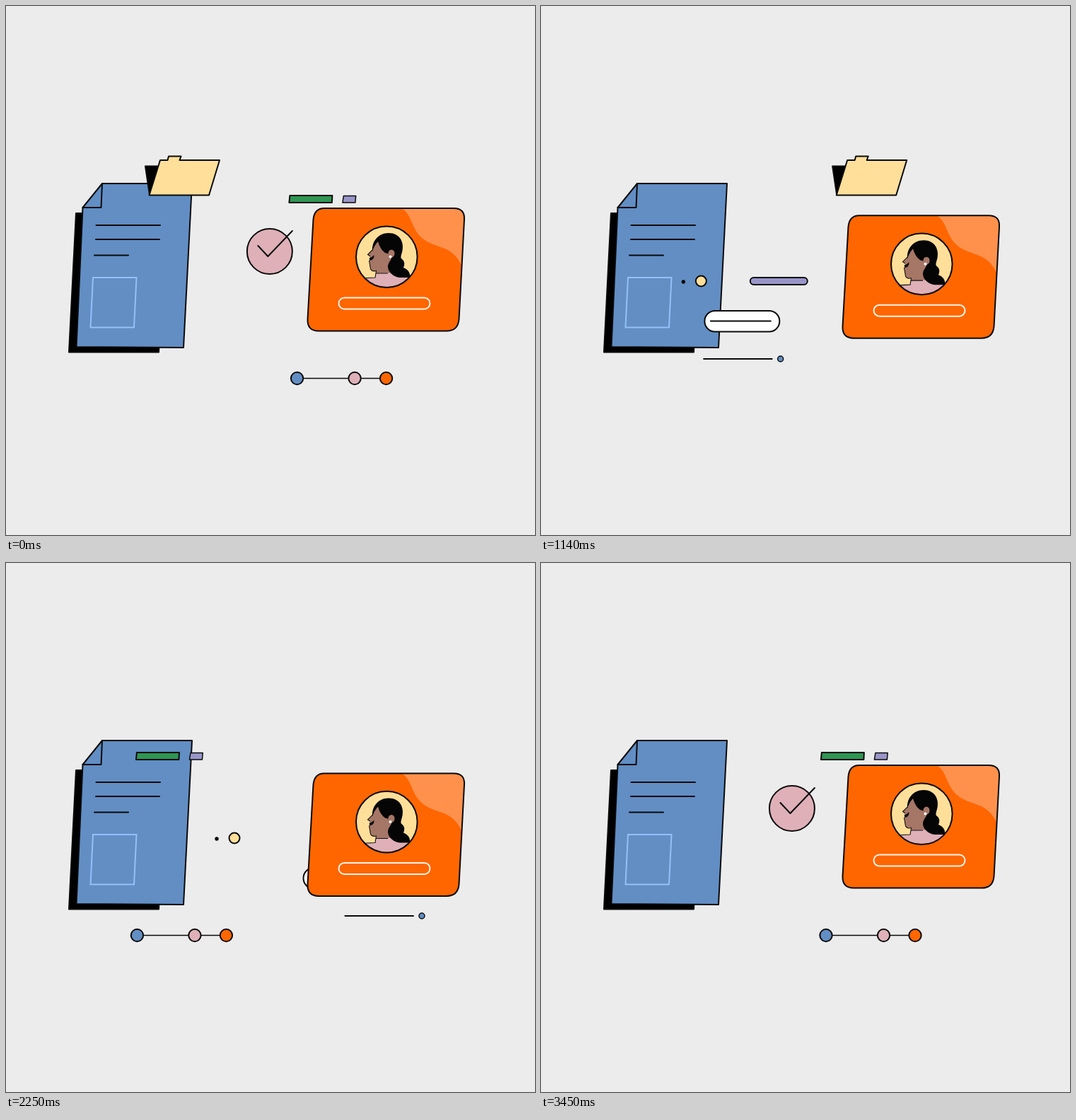
An HTML page that plays this animation: 748 by 748 pixels, repeating every 3510 ms.

```html
<!DOCTYPE html>
<html lang="en">
<head>
<meta charset="utf-8">
<title>Document flow</title>
<style>
html, body { margin: 0; width: 100%; height: 100%; overflow: hidden; background: #ececec; }
svg { display: block; width: 100vw; height: 100vh; }
.ink { stroke: #0a0a0a; stroke-width: 2; stroke-linejoin: round; stroke-linecap: round; }
.line { fill: none; }
.thin { stroke-width: 1.5; }
.blue { fill: #628ec4; }
.pink { fill: #dfb0b8; }
.yellow { fill: #ffdf9a; }
.orange { fill: #ff6600; }
.purple { fill: #9a95c9; }
.skin { fill: #a67667; }
</style>
</head>
<body>
<svg viewBox="0 0 748 748">
  <defs>
    <filter id="rough" filterUnits="userSpaceOnUse" x="0" y="0" width="748" height="748" color-interpolation-filters="sRGB">
      <feTurbulence type="fractalNoise" baseFrequency=".25" seed="4"/>
      <feDisplacementMap in="SourceGraphic" scale="1.2" xChannelSelector="R" yChannelSelector="G"/>
    </filter>
    <clipPath id="portrait"><circle cx="538.3" cy="354.7" r="43"/></clipPath>
    <path id="panel" d="M450 286H633Q649 286 648 302L640.5 443Q639 459.5 623 459.5H442Q426 459.5 426.5 443L434.5 302Q436 286 450 286Z"/>
  </defs>
  <g filter="url(#rough)">
    <g id="paper">
      <path d="M99 293H225L216 489.5H89Z" class="ink"/>
      <path d="M136 251H263L251 483L99.5 482L108.5 285Z" class="ink blue"/>
      <path d="M136 251L134.5 285H108.5M127.5 310H218M127 330H217M125 352.5H173" class="ink line"/>
      <path d="M123 384H184.5L181 454.5H119.5Z" class="line" stroke="#94c0f8" stroke-width="2"/>
    </g>

    <g id="knob" class="ink">
      <circle cx="212" cy="390" r="1.7"/>
      <circle cx="237" cy="389" r="7.5" class="yellow"/>
    </g>
    <g id="pill" class="ink">
      <rect x="192.5" y="431" width="106" height="29.5" rx="14.7" fill="#fff"/>
      <path d="M201 445.5H286"/>
    </g>
    <rect id="stick" x="258.5" y="384" width="81" height="10" rx="5" class="ink purple"/>
    <g id="check" class="ink">
      <circle cx="370.5" cy="347" r="32" class="pink"/>
      <path d="M354 339L368 354L402.5 318" class="line"/>
    </g>
    <g id="bars" class="ink">
      <path d="M402 268H462L461.5 278H401Z" fill="#2f9653"/>
      <path d="M478 268.5H495.3L494.5 278H476.5Z" class="thin purple"/>
    </g>
    <g id="timeline" class="ink">
      <path d="M421 526.5H530" class="thin"/>
      <circle cx="412.5" cy="526.5" r="8.7" class="blue"/>
      <circle cx="494" cy="526.5" r="8.7" class="pink"/>
      <circle cx="538.5" cy="526.5" r="8.7" class="orange"/>
    </g>
    <g id="wire" class="ink">
      <path d="M313.5 499H410"/>
      <circle cx="422" cy="499" r="4" class="thin blue"/>
    </g>

    <g id="card">
      <use href="#panel" class="orange"/>
      <path d="M560 286C576 297 572 317 592 331C612 344 630 338 644.5 367L648 302Q649 286 633 286Z" fill="#ff914d"/>
      <use href="#panel" class="ink line"/>
      <circle cx="538.3" cy="354.7" r="43.3" class="yellow"/>
      <g clip-path="url(#portrait)">
        <path d="M521 332L518 345L511.5 351.5L515 354L513.5 360L515.5 372Q519 376 524 374L522.5 384H553V340L540 328Z" class="skin"/>
        <path d="M500 385L522 384L523.5 378L553 377L572 386V400H500Z" class="pink"/>
        <path d="M500 385L522 384L523.5 374.5Q518 376 515.5 372L513.5 360M523 378L540 378M518 345L511.5 351.5L515 354" class="line" stroke="#111" stroke-width="1.1"/>
        <path d="M518 347C517 332 527 321 541 321C557 321 563 334 560.5 346C559 352 557 356 560 358C565 362 563 367 562 370C570 373 572 379 571 384H557C546 383 537 373 541 364C543 360 546 357 546 352L536 349Q529 344 526 333Q521 338 518 347Z" fill="#050505"/>
        <ellipse cx="545" cy="350" rx="4.5" ry="5.5" class="skin"/>
        <circle cx="543.5" cy="354.5" r="2" fill="#fff"/>
        <path d="M513.8 356Q518 355 520.5 352Q521 359 514 360Z" fill="#111"/>
      </g>
      <circle cx="538.3" cy="354.7" r="43.3" class="ink line"/>
      <rect x="470.5" y="412.5" width="129" height="16" rx="8" class="line" stroke="#fff3e8" stroke-width="2"/>
    </g>

    <g id="folder" class="ink">
      <path d="M197 226.5H216L203 267Z"/>
      <path d="M218 218H228.5L230 212.5H247.5L245.5 218H302L287 267.5H202.5Z" class="yellow"/>
    </g>
    <g id="sparkle" class="ink" style="stroke-width:1.2">
      <path d="M603.3 270.5L602.5 280M601.3 309L600.8 319" class="line"/>
      <path d="M602.6 278Q603 292 619.5 294.5Q603 297 601.5 311Q600 297 584.5 294.5Q600 292 602.6 278Z" fill="#fff"/>
    </g>
  </g>
</svg>
<script>
const LOOP = 3510, REST = 80;
const el = id => document.getElementById(id);

// Ease in and out; a larger power gives a sharper middle.
function ease(t, start, span, power = 2) {
  const u = Math.min(1, Math.max(0, (t - start) / span));
  return u ** power / (u ** power + (1 - u) ** power);
}

const glide = (start, span, from, dist, power) => ({
  start, end: start + span,
  at: t => from + dist * ease(t, start, span, power)
});

const travel = {
  folder: { start: 0, end: 2005, at: t => 216 * ease(t, 0, 1210) + 162 * ease(t, 1182, 823) },
  pill: glide(665, 1510, -1, 229),
  stick: glide(665, 1510, -1, 220),
  wire: glide(789, 1641, -118, 295, 1.55),
  knob: glide(984, 2950, -11.5, 270),
  bars: glide(1590, 2350, -252, 264),
  timeline: glide(1715, 2360, -267.5, 311, 1.55),
  check: glide(2575, 1600, -165, 252)
};

function show(id, visible, transform) {
  el(id).style.display = visible ? "" : "none";
  el(id).setAttribute("transform", transform);
}

function draw(t) {
  for (const [id, { start, end, at }] of Object.entries(travel)) {
    const time = t < start ? t + LOOP : t;
    show(id, time <= end + REST, `translate(${at(time)} 0)`);
  }

  const bob = 7 * (1 - Math.cos(2 * Math.PI * t / LOOP));
  show("card", true, `translate(0 ${bob})`);

  const twinkle = Math.cos((t - 750) / 240 * Math.PI / 2);
  show("sparkle", Math.abs(t - 750) < 240,
    `translate(602 294.5) scale(${twinkle}) translate(-602 -294.5)`);
}

// Motion is held in alternating 90 ms and 60 ms steps.
const begin = performance.now();
let last = -1;
function tick() {
  const t = (performance.now() - begin) % LOOP;
  const step = Math.floor(Math.floor(t / 30) / 2.5);
  if (step !== last) draw(Math.ceil(step * 2.5) * 30);
  last = step;
  requestAnimationFrame(tick);
}
tick();
</script>
</body>
</html>
```
